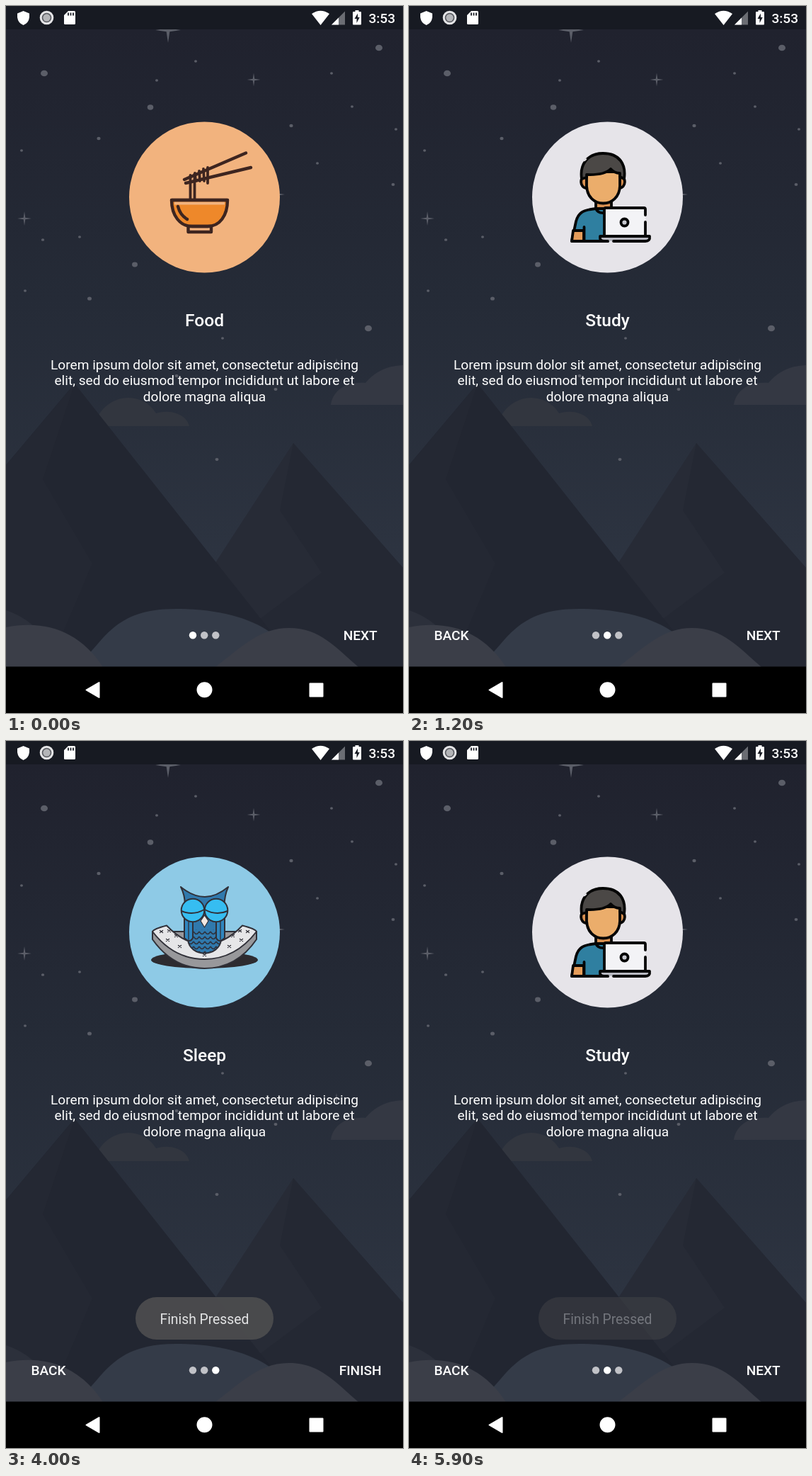
Write an HTML page that moves like this. It is 561x998 px and loops after 6 s.

```html
<!DOCTYPE html>
<html lang="en">
<head>
<meta charset="utf-8">
<title>Onboarding</title>
<style>
  html, body { margin: 0; width: 100%; height: 100%; overflow: hidden; background: #000; }
  svg { display: block; width: 100%; height: 100%; }
  text { font: 400 19.1px Roboto, sans-serif; fill: #fff; }
  .mid { text-anchor: middle; }
  .bold { font-weight: 500; }
  .title { font-size: 24.5px; font-weight: 500; }
  .line { fill: none; stroke-linecap: round; stroke-linejoin: round; }
  .ink { stroke-linecap: round; stroke-linejoin: round; }
</style>
</head>
<body>
<svg viewBox="0 0 561 998" preserveAspectRatio="none">
  <defs>
    <linearGradient id="sky" x1="0" y1="33" x2="0" y2="800" gradientUnits="userSpaceOnUse">
      <stop offset="0" stop-color="#20222e"/>
      <stop offset=".5" stop-color="#252b37"/>
      <stop offset="1" stop-color="#2d3441"/>
    </linearGradient>
    <pattern id="scales" x="257" y="268" width="8" height="7" patternUnits="userSpaceOnUse">
      <path d="M0 1Q4 8 8 1" fill="none" stroke="#2c3340" stroke-width="1.7"/>
    </pattern>
  </defs>

  <!-- scenery -->
  <rect width="561" height="933" fill="url(#sky)"/>
  <g id="stars" fill="#5b5e68"></g>
  <path d="M125 593C130 568 152 553 173 553Q199 554 212 575C231 569 254 575 259 593Z" fill="#32363f"/>
  <path d="M459 563C461 546 477 529 508 532Q528 508 561 507V563Z" fill="#343843"/>
  <path d="M406 617L561 793V933H200Z" fill="#272b36"/>
  <path d="M406 617L387 712 446 800 355 868 420 933H561V793Z" fill="#242833"/>
  <path d="M97 533L0 648V933H414Z" fill="#222631"/>
  <path d="M97 533L0 648V933H60L122 787 52 668Z" fill="#242833"/>
  <path d="M0 853Q28 862 50 886V933H0Z" fill="#2c303b"/>
  <path d="M100 933C140 895 152 851 240 851C305 851 350 866 376 886L420 933Z" fill="#343b48"/>
  <path d="M0 877C56 866 104 883 137 933H0Z" fill="#3b3e48"/>
  <path d="M296 933C336 902 360 878 400 878C444 878 466 906 498 933Z" fill="#3b3e48"/>

  <!-- pages -->
  <g class="page">
    <circle cx="280.5" cy="270" r="106.5" fill="#f2b37e"/>
    <g class="ink" stroke="#3d2520" stroke-width="4.4" fill="none">
      <path d="M234 274C234 296 246 311 263 311H285C302 311 313 296 313 274Z" fill="#ee882a"/>
      <path d="M238 278.5H309" stroke="#f2b37e" stroke-width="4" stroke-linecap="butt"/>
      <path d="M234 274H313M243 283Q246 295 256 301M257.5 311H290V319H257.5Z"/>
      <path d="M252 245L339 207.500M254 250L346 228"/>
      <path d="M260.500 239V273M266.500 237V273M267 236L268 247M273 233L274 247M279 230L280 247M285 228V250" stroke-width="3.800"/>
    </g>
    <text class="mid title" x="280.5" y="452">Food</text>
  </g>

  <g class="page">
    <circle cx="280.5" cy="270" r="106.5" fill="#e6e4e9"/>
    <g class="ink" stroke="#050505" stroke-width="3.8">
      <path d="M264 274V291L274 298 286 291V274Z" fill="#d99050"/>
      <path d="M264 286C244 288 239 293 236 304L230 332H281V286Z" fill="#2f7fa0"/>
      <path d="M232 317H247V332H230Z" fill="#e59c5a"/>
      <path class="line" d="M247.500 312V332M264 286Q267 293 276 292"/>
      <path d="M251 240C240 240 241 257 251 257ZM297 240C308 240 307 257 297 257Z" fill="#d99050"/>
      <path d="M251 234V253C251 287 298 287 298 253V234Z" fill="#ebad6b"/>
      <path d="M244 244C241 224 252 208 274 208C298 208 307 224 304 244L298 241V236Q290 236 285 230Q276 239 251 238V242Z" fill="#4b4846"/>
      <path d="M245 221L256 211" stroke="#e6e4e9" stroke-width="2" stroke-dasharray="3 20" stroke-dashoffset="-4"/>
      <path d="M276 325V287Q276 285 278 285H332Q334 285 334 287V325Z" fill="#f3f3f6" stroke="none"/>
      <path class="line" d="M276 324V287Q276 285 278 285H332Q334 285 334 287V295M334 305V324"/>
      <circle cx="304.500" cy="305.500" r="5" fill="#c7c8cf"/>
      <path d="M270 325H340Q341 332 334 332H276Q269 332 270 325Z" fill="#b7b8c1" stroke="none"/>
      <path class="line" d="M281 332H276Q269 332 270 325H340Q341 332 334 332H289"/>
    </g>
    <text class="mid title" x="280.5" y="452">Study</text>
  </g>

  <g class="page">
    <circle cx="280.5" cy="270" r="106.5" fill="#8ecae6"/>
    <ellipse cx="280.5" cy="309" rx="75.500" ry="12" fill="#2d2b30"/>
    <g class="ink" stroke="#303038" stroke-width="2">
      <path d="M207 269V280Q236 321 280.500 321Q326 321 354 280V269Z" fill="#98989b"/>
      <path d="M207 269Q209 265 227 260.500Q252 287 280.500 287Q309 287 334 260.500Q352 265 354 269Q324 308 280.500 308Q237 308 207 269Z" fill="#e6e6e8"/>
      <path id="ticks" class="line" stroke-width="1.300"/>
      <path d="M247 206Q264 220 281 220Q297 220 314 206Q307 222 309 240L304 280C302 306 259 306 257 280L252 240Q255 222 247 206Z" fill="#3079ad"/>
      <path d="M257 266H304V280C302 306 259 306 257 280Z" fill="url(#scales)" stroke="none"/>
      <path d="M252 248H264V278Q260 286 252 278ZM297 248H309V278Q301 286 297 278Z" fill="#2f86bf"/>
      <path class="line" d="M258 254V280M303 254V280" stroke-width="1.300"/>
      <circle cx="264" cy="239" r="16.300" fill="#36bdf1"/>
      <circle cx="297" cy="239" r="16.300" fill="#36bdf1"/>
      <path class="line" d="M248 240Q264 247 280 238M281 238Q297 247 313 240"/>
      <path d="M280.500 246L286 254 280.500 263 275 254Z" fill="#f1e9e3" stroke-width="1.200"/>
    </g>
    <text class="mid title" x="280.5" y="452">Sleep</text>
  </g>

  <!-- controls -->
  <text id="back" class="bold mid" x="60" y="894.700">BACK</text>
  <text id="next" class="bold mid" x="500.700" y="894.700">NEXT</text>
  <g id="dots">
    <circle cx="264" cy="888.300" r="5.200"/>
    <circle cx="280.200" cy="888.300" r="5.200"/>
    <circle cx="296.300" cy="888.300" r="5.200"/>
  </g>
  <g id="toast">
    <rect x="183" y="785" width="195" height="60" rx="30" fill="#4f4f50"/>
    <text class="mid" x="280.400" y="823" style="font-size:19.300px">Finish Pressed</text>
  </g>

  <!-- system bars -->
  <rect width="561" height="33" fill="#171a22"/>
  <g fill="#fff">
    <path d="M24.500 7L33 10.500V16Q32 24 24.500 27Q17 24 16 16V10.500Z"/>
    <circle cx="57.500" cy="16.500" r="8.300" fill="#55575d" stroke="#e4e4e6" stroke-width="3"/>
    <circle cx="57.500" cy="16.500" r="5.200" fill="#b4b5b8"/>
    <path d="M88 7H96.500Q98 7 98 8.500V24.500Q98 26 96.500 26H83.500Q82 26 82 24.500V13Z"/>
    <path d="M88 9.500V13.500M91.500 9.500V13.500M95 9.500V13.500" stroke="#171a22" stroke-width="1.800"/>
    <path d="M432 11Q444.500 2.500 457 11L444.500 27Z"/>
    <path d="M479 7.500V26.500H460Z" fill="#6b6d73"/>
    <path d="M470 16.500V26.500H460Z"/>
    <path d="M490 9Q490 8 491 8H493.500V6H498.500V8H501Q502 8 502 9V25.500Q502 26.500 501 26.500H491Q490 26.500 490 25.500Z"/>
    <path d="M497 10.500L492.500 18H495.500V24L499.700 16H497Z" fill="#171a22"/>
  </g>
  <text class="bold mid" x="531.200" y="24">3:53</text>
  <rect y="932.500" width="561" height="66" fill="#000"/>
  <g fill="#fff" stroke="#fff" stroke-width="2" stroke-linejoin="round">
    <path d="M113.500 965.500L131.500 955V976Z"/>
    <circle cx="280.500" cy="965.300" r="10"/>
    <rect x="429.500" y="956.500" width="18" height="18"/>
  </g>
</svg>

<script>
  const LOOP = 6000, TICK = 100, WIDTH = 561, SLIDE = 200;
  const $ = id => document.getElementById(id);
  const pages = [...document.querySelectorAll('.page')];
  const dots = [...$('dots').children];

  // x, y, radius
  const specks = [
    [54, 95, 5], [204, 143, 4.3], [527, 59, 5], [234, 252, 4], [182, 365, 4], [512, 455, 5],
    [131, 187, 2.6], [118, 413, 3], [268, 78, 2], [213, 105, 2], [460, 95, 2], [489, 142, 2],
    [403, 169, 2.6], [440, 222, 2], [551, 174, 2], [547, 252, 2.4], [22, 204, 2], [52, 330, 2.2],
    [104, 326, 2], [27, 402, 2], [195, 274, 2], [353, 318, 2.5], [306, 469, 2], [241, 522, 2.5],
    [381, 541, 2.5], [298, 640, 2.5]
  ];
  const sparkles = [[229, 34, 18], [350, 104, 9.5], [381, 266, 13], [26, 300, 10], [467, 505, 8]];

  const speck = ([x, y, r]) => `<ellipse cx="${x}" cy="${y}" rx="${r}" ry="${r * 0.85}"/>`;
  const sparkle = ([x, y, r]) => {
    const k = r * 0.13;
    return `<path d="M${x} ${y - r}l${k} ${r - k} ${r - k} ${k} ${k - r} ${k} ${-k} ${r - k} ` +
      `${-k} ${k - r} ${k - r} ${-k} ${r - k} ${-k}z"/>`;
  };
  $('stars').innerHTML = specks.map(speck).join('') + sparkles.map(sparkle).join('');

  // mattress stitches, mirrored about the middle
  const cross = (x, y) => `M${x - 2} ${y - 1.500}l4 3m0 -3l-4 3`;
  $('ticks').setAttribute('d', [[61, 269], [52, 281], [50, 268], [40, 275], [35, 290]]
    .map(([dx, y]) => cross(280.5 - dx, y) + cross(280.5 + dx, y)).join('') + cross(280.5, 302));

  const lines = [
    'Lorem ipsum dolor sit amet, consectetur adipiscing',
    'elit, sed do eiusmod tempor incididunt ut labore et',
    'dolore magna aliqua'
  ];
  const copy = lines.map((s, i) =>
    `<text class="mid" x="280.5" y="${512.8 + i * 22.4}">${s}</text>`).join('');
  pages.forEach(p => p.insertAdjacentHTML('beforeend', copy));

  // start time, from page, to page
  const moves = [[976, 0, 1], [2371, 1, 2], [4855.1, 2, 1]];
  const clamp = v => Math.min(1, Math.max(0, v));

  function pager(t) {
    let page = 0, scroll = 0;
    for (const [start, from, to] of moves) {
      if (t < start) break;
      const left = Math.floor(WIDTH * (1 - clamp((t - start) / SLIDE)) ** 5);
      page = to;
      scroll = to * WIDTH - (to - from) * left;
    }
    return { page, scroll };
  }

  function toastAlpha(t) {
    const rise = 1 - (1 - clamp((t - 3680) / 500)) ** 2;
    const fall = clamp((t - 5500) / 500) ** 2;
    return rise * (1 - fall);
  }

  const born = performance.now();
  function draw() {
    const now = (performance.now() - born) % LOOP;
    const t = Math.floor(now / TICK) * TICK;
    const { page, scroll } = pager(t);
    pages.forEach((p, i) => p.setAttribute('transform', `translate(${i * WIDTH - scroll} 0)`));
    dots.forEach((d, i) => d.setAttribute('fill', i === page ? '#fff' : '#c1c2c7'));
    $('back').style.display = page ? '' : 'none';
    $('next').textContent = page === 2 ? 'FINISH' : 'NEXT';
    $('toast').setAttribute('opacity', toastAlpha(t));
    requestAnimationFrame(draw);
  }
  draw();
</script>
</body>
</html>
```
